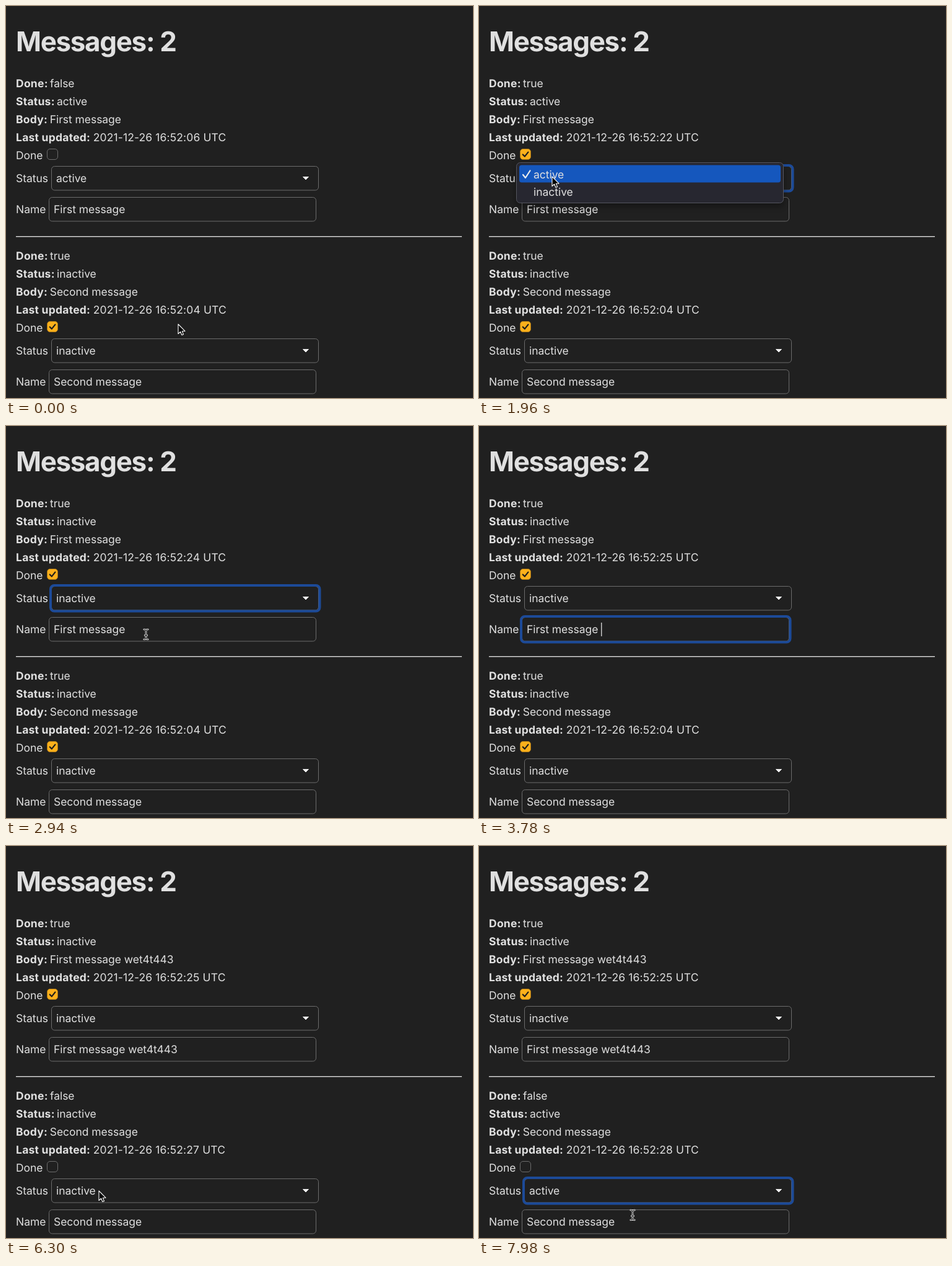
These frames come from a looping animation (754x632 px, 8 s). An HTML page:

```html
<!DOCTYPE html>
<html lang="en">
<head>
<meta charset="utf-8">
<title>Messages</title>
<style>
  html, body { margin: 0; width: 100%; height: 100%; overflow: hidden; background: #202020; }
  svg { display: block; width: 754px; height: 632px; }
  text { font: 430 17.5px Inter, sans-serif; letter-spacing: -.04px; font-optical-sizing: none;
         fill: #e0e0e0; white-space: pre; text-rendering: geometricPrecision; }
  .bold { font-weight: 700; letter-spacing: .24px; }
  .date { letter-spacing: .13px; }
  .title { font-size: 44px; font-weight: 700; letter-spacing: -1.35px; }
  .field { fill: #202020; stroke: #6c6c6c; }
  .focus { fill: none; stroke: #1c4a98; stroke-width: 4; }
  .menu { fill: #272730; stroke: #55565f; }
  .menu-shadow { fill: #000; opacity: .3; filter: blur(5px); }
  .pointer { fill: #000; stroke: #fff; stroke-width: 1.1; stroke-linejoin: round; }
  .hand { fill: #fff; stroke: #000; stroke-width: 1; stroke-linejoin: round; }
  .ring { fill: none; stroke: #e4e4e4; stroke-width: 1.2; }
</style>
</head>
<body>
<svg id="stage" viewBox="0 0 754 632"></svg>
<script>
const DURATION = 8000, STEP = 70;
const stage = document.getElementById('stage');

// Pointer path: time, x, y, shape from that time on
const path = [
  [0, 278, 513, 'arrow'], [490, 72, 240, 'hand'], [1610, 72, 240, 'arrow'],
  [1820, 118, 275, 'arrow'], [2170, 118, 275, 'arrow'], [2310, 122, 292, 'arrow'],
  [2660, 122, 292, 'arrow'], [2940, 226, 336, 'beam'], [3570, 226, 336, 'none'],
  [4060, 226, 336, 'arrow'], [4480, 82, 510, 'arrow'], [4620, 82, 510, 'arrow'],
  [4830, 92, 565, 'arrow'], [5110, 84, 541, 'arrow'], [5390, 76, 524, 'hand'],
  [6090, 76, 524, 'arrow'], [6300, 150, 556, 'arrow'], [6720, 150, 556, 'arrow'],
  [7070, 152, 531, 'arrow'], [7350, 156, 525, 'arrow'], [7630, 156, 525, 'arrow'],
  [7910, 248, 595, 'beam']
];
const clicks = [490, 1330, 3010, 5460];
const typedSuffix = ' wet4t443';
const keyTimes = [3570, 3850, 3920, 4060, 4130, 4270, 4410, 4620, 4760];

const shapes = {
  arrow: '<path class="pointer" d="M0 0V15.5L3.6 12.2 5.9 17.5 8.5 16.4 6.3 11.2H11Z"/>',
  hand: `<path class="hand" d="M-1.6 1Q-1.6-.8 0-.8T1.6 1V6Q4-.2 4.6 6.4 6.6 5 7.2 7.2
    9.2 6.8 9 9.4V12L7.4 16H-.4L-4 10.6Q-4.8 8.4-3 8.6L-1.6 9.8Z"/>
    <path class="hand" fill="none" d="M2 11V14M4 11V14M6 11V14"/>`,
  beam: `<g fill="none" stroke-linecap="round">${[['#fff', 2.6], ['#000', 1]].map(([color, width]) =>
    `<path stroke="${color}" stroke-width="${width}" d="M-3.2-8Q0-8 0-6Q0-8 3.2-8M0-6V6M-3.2 8Q0 8 0 6Q0 8 3.2 8M-1.8 1.5H1.8"/>`).join('')}</g>`,
  none: ''
};

const during = (t, from, to) => t >= from && t < to;
const mix = (a, b, k) => a + (b - a) * k;

const text = (x, y, value, attrs = '') => `<text x="${x}" y="${y}" ${attrs}>${value}</text>`;
const rect = (x, y, w, h, r, cls) =>
  `<rect x="${x}" y="${y}" width="${w}" height="${h}" rx="${r}" class="${cls}"/>`;

function pointerAt(t) {
  const i = path.findLastIndex(key => key[0] <= t);
  const [t0, x0, y0, shape] = path[i];
  const [t1, x1, y1] = path[i + 1] || [DURATION, x0, y0];
  let k = (t - t0) / (t1 - t0);
  k = k * k * (3 - 2 * k);
  return { x: mix(x0, x1, k), y: mix(y0, y1, k), shape };
}

function typedName(t) {
  const count = keyTimes.filter(time => time <= t).length;
  return 'First message' + typedSuffix.slice(0, count);
}

function checkbox(checked) {
  return checked
    ? `<rect x="66.5" y="230.5" width="17" height="17" rx="4.5" fill="#fdb01b" stroke="#a8761a" stroke-width=".8"/>
       <path d="M70.8 239.4L73.8 242.6 79.4 235.6" fill="none" stroke="#1c1c1c" stroke-width="2.2" stroke-linecap="round" stroke-linejoin="round"/>`
    : rect(66.5, 230.5, 17, 17, 4.5, 'field');
}

function message(m) {
  const details = [
    ['Done:', 71, m.done], ['Status:', 82, m.status], ['Body:', 70.7, m.body],
    ['Last updated:', 140.7, `2021-12-26 16:52:${m.seconds} UTC`, 'class="date"']
  ];
  return `<g transform="translate(0 ${m.top})">
    ${details.map(([label, x, value, attrs], i) =>
      text(16, 131 + 29 * i, label, 'class="bold"') + text(x, 131 + 29 * i, value, attrs)).join('')}
    ${text(16, 247, 'Done')}${checkbox(m.checked)}
    ${text(16, 284.3, 'Status')}${rect(73.5, 258.5, 431, 38.5, 5, 'field')}
    ${m.focus === 'status' ? rect(72, 257, 434.5, 41.5, 6, 'focus') : ''}
    ${text(81, 284.3, m.selected)}
    <path d="M479.5 275.5H488.5L484 280Z" fill="#eee" stroke="#eee" stroke-linejoin="round"/>
    ${text(16, 334.3, 'Name')}${rect(69.5, 308.5, 431, 38.5, 5, 'field')}
    ${m.focus === 'name' ? rect(68, 307, 434.5, 41.5, 6, 'focus') : ''}
    ${text(77, 334.3, m.name, m.focus === 'name' ? 'id="edited"' : '')}
    ${m.focus === 'name' ? '<rect id="caret" y="317" width="1.2" height="22" fill="#eee"/>' : ''}
  </g>`;
}

function menu(top, checkedRow, litRow, opacity) {
  const row = (label, i) =>
    (i === litRow ? `<rect x="65" y="${4.5 + 28 * i}" width="422" height="28" rx="4" fill="#1557bd"/>` : '') +
    (i === checkedRow ? `<path d="M71 ${20 + 28 * i}l4 5 7.5-11.5" fill="none" stroke="#eee" stroke-width="2.2" stroke-linecap="round" stroke-linejoin="round"/>` : '') +
    text(88, 25.5 + 28 * i, label);
  return `<g transform="translate(0 ${top})" opacity="${opacity}">
    ${rect(59, 4, 434, 68, 8, 'menu-shadow')}${rect(60.5, .5, 431, 65, 6, 'menu')}
    ${['active', 'inactive'].map(row).join('')}</g>`;
}

function menus(t, pointer) {
  const fade = start => 1 - Math.max(0, t - start) / 140;
  if (during(t, 1960, 2870)) {
    const lit = during(t, 2520, 2660) ? -1 : +(t >= 2660 || pointer.y > 285);
    return menu(252, 0, lit, fade(2730));
  }
  if (during(t, 6440, 7770)) {
    const lit = during(t, 7490, 7560) ? -1 : +(t < 7560 && pointer.y > 535);
    return menu(502, 1, lit, fade(7630));
  }
  return '';
}

function clickRing(t, { x, y }) {
  const start = clicks.find(time => during(t, time, time + 350));
  if (start === undefined) return '';
  const r = 31 - Math.max(0, t - start - 140) * .06;
  return `<g transform="translate(${x} ${y})" class="ring"><circle r="${r}"/><circle r="${r - 2.7}"/></g>`;
}

function draw(t) {
  const pointer = pointerAt(t);
  const first = {
    top: 0, done: t >= 1610, checked: t >= 1470,
    status: t >= 2940 ? 'inactive' : 'active', selected: t >= 2800 ? 'inactive' : 'active',
    body: typedName(t - 210), name: typedName(t),
    seconds: t < 1610 ? '06' : t < 2940 ? '22' : t < 3780 ? '24' : '25',
    focus: during(t, 1890, 3010) ? 'status' : during(t, 3010, 5460) ? 'name' : ''
  };
  const second = {
    top: 278, done: t < 5740, checked: t < 5600,
    status: t >= 7840 ? 'active' : 'inactive', selected: t >= 7630 ? 'active' : 'inactive',
    body: 'Second message', name: 'Second message',
    seconds: t < 5740 ? '04' : t < 7840 ? '27' : '28',
    focus: t >= 6370 ? 'status' : ''
  };
  stage.innerHTML = text(16, 73, 'Messages: 2', 'class="title"') +
    message(first) + '<rect x="16" y="371" width="720" height="1.4" fill="#dbdbdb"/>' + message(second) +
    menus(t, pointer) + clickRing(t, pointer) +
    `<g transform="translate(${pointer.x} ${pointer.y})">${shapes[pointer.shape]}</g>`;

  const caret = document.getElementById('caret');
  if (caret) caret.setAttribute('x', 77 + document.getElementById('edited').getComputedTextLength());
}

let lastStep = -1;
function tick() {
  const step = Math.floor(performance.now() % DURATION / STEP);
  if (step !== lastStep) draw((lastStep = step) * STEP);
  requestAnimationFrame(tick);
}
tick();
</script>
</body>
</html>
```
